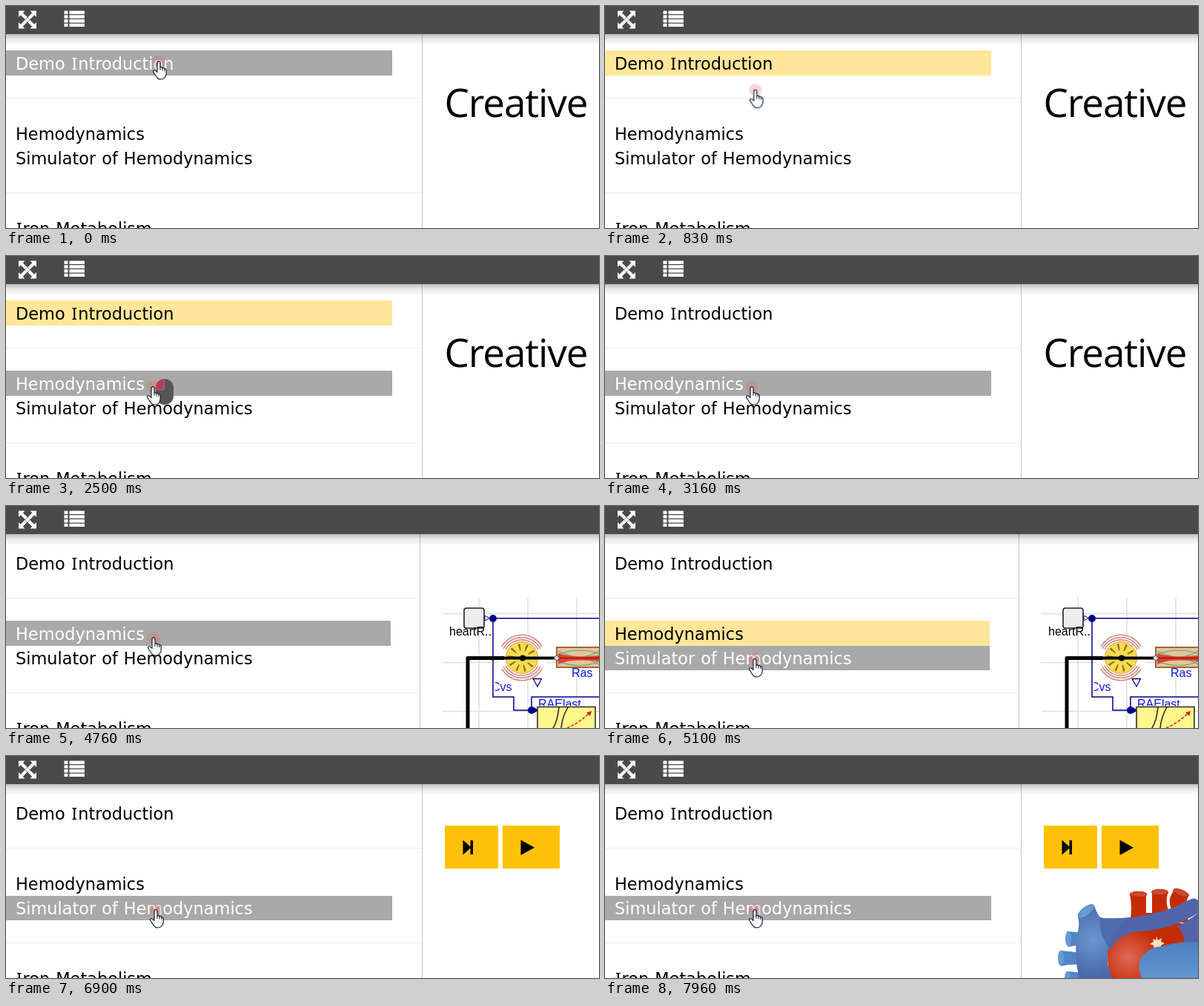
An HTML page for the animation above (8 s loop, 800x300 px).

```html
<!DOCTYPE html>
<html lang="en">
<head>
<meta charset="utf-8">
<title>Menu demo</title>
<style>
  html, body { margin: 0; width: 100%; height: 100%; overflow: hidden; background: #fff; }
  svg { display: block; width: 800px; height: 300px; }

  /* one 8 s loop shared by every part: 1% = 80 ms */
  .demo, .hemo, .simu, .rules, .bar, .heading, .diagram, .buttons, .heart, .click {
    animation: 8s step-end infinite;
  }
  .item text { fill: currentColor; }
  .menu { font: 22.45px "DejaVu Sans", sans-serif; word-spacing: .8px; }
  .menu .serif { font-family: "Noto Sans", sans-serif; }
  .heading { font: 53px "Open Sans", "Noto Sans", sans-serif; letter-spacing: -1.1px; animation-name: heading; }
  .labels { font: 16px "Liberation Sans", Arial, sans-serif; fill: #1414e0; }

  .demo { animation-name: demo; }
  .hemo { animation-name: hemo; }
  .simu { animation-name: simu; }
  .bar { --dx: -2px; animation-name: narrow; }
  .rules { --dx: -3px; animation-name: narrow; }
  .diagram { animation-name: diagram; }
  .buttons { animation-name: buttons; }
  .heart { animation-name: heart; }
  .click { animation-name: click; }
  .cursor { animation: move 8s linear infinite; }

  @keyframes demo {
    0% { fill: #a9a9a9; color: #fff; }
    9.58% { fill: #ffe699; color: #000; }
    39.5%, 100% { fill: #fff; color: #000; }
  }
  @keyframes hemo {
    0% { fill: #fff; color: #000; }
    16.25% { fill: #a9a9a9; color: #fff; }
    62.1% { fill: #ffe699; color: #000; }
    84.5%, 100% { fill: #fff; color: #000; }
  }
  @keyframes simu {
    0% { fill: #fff; color: #000; }
    62.1%, 100% { fill: #a9a9a9; color: #fff; }
  }
  @keyframes narrow {
    0% { transform: none; }
    44.5% { transform: translateX(var(--dx)); }
    86.25%, 100% { transform: none; }
  }
  @keyframes heading { 0% { opacity: 1; } 41.25%, 100% { opacity: 0; } }
  @keyframes diagram { 0% { opacity: 0; } 44.5% { opacity: 1; } 86.25%, 100% { opacity: 0; } }
  @keyframes buttons { 0% { opacity: 0; } 86.25%, 100% { opacity: 1; } }
  @keyframes heart { 0% { opacity: 0; } 90.375%, 100% { opacity: 1; } }
  @keyframes click {
    0% { opacity: 0; }
    31.25% { opacity: 1; }
    39.5% { opacity: 0; }
    80.375% { opacity: 1; }
    84.5%, 100% { opacity: 0; }
  }
  @keyframes move {
    0%, 5.42% { transform: translate(206px, 76px); animation-timing-function: cubic-bezier(.35, .2, .7, .75); }
    15.375% { transform: translate(199px, 160px); }
    16.25% { transform: translate(199px, 166px); animation-timing-function: ease-out; }
    18.75%, 58.63% { transform: translate(198px, 178px); }
    59.5% { transform: translate(199px, 179px); animation-timing-function: cubic-bezier(.4, .3, .6, 1); }
    64.5%, 100% { transform: translate(202px, 209px); }
  }
</style>
</head>
<body>
<svg viewBox="0 0 800 300">
  <defs>
    <linearGradient id="shade" x2="0" y2="1">
      <stop offset="0" stop-opacity=".25"/>
      <stop offset=".4" stop-opacity=".1"/>
      <stop offset="1" stop-opacity="0"/>
    </linearGradient>
    <radialGradient id="red" gradientUnits="userSpaceOnUse" cx="706" cy="272" r="42">
      <stop offset="0" stop-color="#dd6a58"/>
      <stop offset="1" stop-color="#c62c04"/>
    </radialGradient>
    <radialGradient id="blue" gradientUnits="userSpaceOnUse" cx="658" cy="248" r="50">
      <stop offset="0" stop-color="#6797cc"/>
      <stop offset="1" stop-color="#4a68ac"/>
    </radialGradient>
    <linearGradient id="chamber" x2="0" y2="1">
      <stop offset="0" stop-color="#4f7fc0"/>
      <stop offset="1" stop-color="#6096cf"/>
    </linearGradient>
    <path id="corner" d="M-12-12h8.500l-2.700 2.700 5.900 5.900-3 3-5.900-5.900-2.800 2.800z"/>
    <g id="row">
      <rect width="5" height="4.400" rx=".4"/>
      <rect x="7" width="20.500" height="4.400" rx=".4"/>
    </g>
    <g id="tube">
      <path d="M0-10Q12-9 26-7V9Q12 8 0 11Z" fill="#4f86c6"/>
      <ellipse rx="4" ry="10.500" fill="#649ad0"/>
    </g>
    <clipPath id="pane"><path d="M559 38H800V300H559z"/></clipPath>
    <clipPath id="cut"><path d="M660 225H800V270H660z"/></clipPath>
  </defs>

  <g class="menu">
    <g class="item demo"><rect class="bar" x="-10" y="60" width="531" height="34"/><text x="13" y="86">Demo <tspan class="serif" dx="1">I</tspan><tspan dx="1">ntroduction</tspan></text></g>
    <g class="item hemo"><rect class="bar" x="-10" y="155" width="531" height="34"/><text x="13" y="181">Hemodynamics</text></g>
    <g class="item simu"><rect class="bar" x="-10" y="189" width="531" height="33"/><text x="13" y="214">Simulator of Hemodynamics</text></g>
    <text x="13" y="309"><tspan class="serif" dx="1">I</tspan><tspan dx="1">ron Metabolism</tspan></text>
  </g>
  <g class="rules">
    <path d="M-5 124.500H561M-5 252.500H561" stroke="#ebebeb"/>
    <path d="M561.500 38V300" stroke="#c8c8c8"/>
  </g>

  <text class="heading" x="591.500" y="150">Creative</text>

  <g class="diagram" clip-path="url(#pane)" fill="none">
    <path d="M638 124V300M704 124V300M770 124V300M589 145.500H800M589 211.500H800M589 277.500H800" stroke="#dedede" stroke-width="1.500"/>
    <path d="M657 151.700H800M657 152V258H685V276H709M709 276V258H800" stroke="#00008b" stroke-width="1.500"/>
    <rect x="618" y="138" width="27" height="27" rx="3" fill="#ececec" stroke="#222" stroke-width="1.600"/>
    <path d="M646 148l6 3.500-6 3.500z" fill="#fff" stroke="#00008b"/>
    <g fill="#00008b"><circle cx="657" cy="152" r="5"/><circle cx="709" cy="276" r="5"/><path d="M712 272l7 4-7 4z"/></g>

    <circle cx="696" cy="205" r="33" fill="#fff"/>
    <path d="M669 190a31 31 0 0 1 54 0M671 193a28 28 0 0 1 50 0M674 194a25 25 0 0 1 44 0M669 220a31 31 0 0 0 54 0M671 217a28 28 0 0 0 50 0M674 216a25 25 0 0 0 44 0" stroke="#d48a82" stroke-width="1.600"/>
    <circle cx="696" cy="205" r="21.500" fill="#f6dc50" stroke="#d89a4a"/>
    <circle cx="696" cy="205" r="14.500" stroke="#8a681c" stroke-width="9" stroke-dasharray="2 7.110"/>
    <path d="M623 300V205.500H672" stroke="#000" stroke-width="5" stroke-linejoin="round"/>
    <path d="M670 205.500H740" stroke="#000" stroke-width="4"/>
    <circle cx="697" cy="205.500" r="4" fill="#000"/>
    <rect x="743" y="191" width="64" height="27" fill="#e6c49c" stroke="#a8642c" stroke-width="2"/>
    <path d="M745 196Q775 212 800 196M745 214Q775 199 800 214M745 200Q775 190 800 200M745 210Q775 221 800 210" stroke="#5fa882" stroke-width="1.200"/>
    <path d="M745 199Q765 206 800 202V210Q765 206 745 213z" fill="#e3402c"/>
    <path d="M745 205.500H800" stroke="#a01010" stroke-width="1.500"/>
    <path d="M739 205.500l4-4 4 4-4 4z" fill="#ddd" stroke="#222"/>
    <path d="M711 233.500H722.500L717 244z" fill="#fff" stroke="#00008b" stroke-width="1.300"/>

    <rect x="717" y="271.500" width="78" height="40" fill="#fff78c" stroke="#222" stroke-width="1.500"/>
    <path d="M738 300Q744 291 746 272M749 300Q750 286 758 272" stroke="#222" stroke-width="1.500"/>
    <path d="M757 300Q772 294 788 279" stroke="#e02010" stroke-width="1.500" stroke-dasharray="4 2"/>
    <path d="M790 277l-2 7-5-5z" fill="#e02010"/>
    <g class="labels">
      <text x="598" y="175" fill="#000">heartR..</text>
      <text x="763" y="231">Ras</text>
      <g clip-path="url(#cut)"><text x="655" y="250">Cvs</text><text x="718" y="273">RAElast</text></g>
    </g>
  </g>

  <g class="buttons">
    <path d="M592 94H664V152H592zM670 94H747V152H670z" fill="#ffc107"/>
    <path d="M616.500 113.500L626.500 122.500V114H630V133H626.500V124.500L616.500 133.500zM694.500 113.500L713 123.800 694.500 134z"/>
  </g>

  <g class="heart">
    <path d="M708 187Q712 205 708 225H790Q777 212 788 187L768 181Q760 192 760 204V184H737V205Q732 200 731 187z" fill="#c62c04"/>
    <path d="M732 188V212M736 185V212M761 186Q758 198 762 208" fill="none" stroke="#fff" stroke-width="4"/>
    <g fill="#d0482e" stroke="#b82804">
      <ellipse cx="719.500" cy="187" rx="11.500" ry="3.800"/>
      <ellipse cx="748.500" cy="184" rx="11" ry="3.800"/>
      <ellipse cx="777" cy="185" rx="11" ry="4" transform="rotate(22 777 185)"/>
    </g>
    <path d="M680 240Q725 215 778 226Q792 243 792 262L760 300H682Q674 270 680 240z" fill="url(#red)"/>
    <path d="M772 230Q788 222 800 212V264L780 256Q784 243 772 230z" fill="#5662a6"/>
    <path d="M744 244l2 5 5-3-1 5 5 2-5 3 1 5-6-2-4 3-1-6-5-2 5-3-1-4 4 2z" fill="#f4dfc0"/>
    <use href="#tube" x="625" y="247"/>
    <use href="#tube" x="615" y="273"/>
    <use href="#tube" x="624" y="301"/>
    <path d="M638 217Q641 228 637 240Q632 272 640 300H684Q674 278 680 256Q685 240 700 236Q675 228 672 219Q667 218 665 214L660 203z" fill="url(#blue)"/>
    <path d="M668 219Q738 222 787 195Q795 190 800 195V212Q767 234 722 237Q694 239 682 262Q668 242 668 219z" fill="#5164a9"/>
    <path d="M668 219Q690 221 708 219Q690 230 680 254Q666 244 668 219z" fill="#4c6cb0"/>
    <ellipse cx="649" cy="210" rx="13" ry="5.500" transform="rotate(-38 649 210)" fill="#669cd2" stroke="#4a78ba"/>
    <path d="M724 300Q717 282 724 272Q734 258 752 257Q778 249 800 252V300z" fill="url(#chamber)"/>
  </g>

  <rect width="800" height="38" fill="#4a4a4a"/>
  <rect y="38" width="800" height="15" fill="url(#shade)"/>
  <g fill="#fff">
    <g transform="translate(29 18.500)">
      <use href="#corner"/><use href="#corner" transform="rotate(90)"/>
      <use href="#corner" transform="rotate(180)"/><use href="#corner" transform="rotate(270)"/>
      <path d="M-3.200 0L0-3.200 3.200 0 0 3.200z"/>
    </g>
    <use href="#row" x="78.500" y="6.600"/><use href="#row" x="78.500" y="12.300"/>
    <use href="#row" x="78.500" y="18"/><use href="#row" x="78.500" y="23.700"/>
  </g>

  <g class="cursor">
    <circle cy="-1" r="8.500" fill="#f06464" fill-opacity=".27"/>
    <g class="click">
      <rect x="4" y="-12" width="24" height="35" rx="12" fill="#555"/>
      <path d="M15-11.500A11.500 11.500 0 0 0 4.500 2H15z" fill="#e0303c"/>
      <path d="M15.500-11.500V2.500H4.500" fill="none" stroke="#7a7a9a"/>
      <path d="M12-7Q8-2 12 2" fill="none" stroke="#3c5ce0" stroke-width="1.500"/>
    </g>
    <g transform="translate(0 -1.500)" stroke="#111a2c">
      <path d="M-2 2.200a2 2 0 0 1 4 0V8.500q2.200-1.200 3 .8q2.200-.8 2.900 1q2.300-.3 2.300 2.200V17q0 3-2 5-2 2.500-5 2.500-4 0-5.200-2-1.500-2-4.500-6.500-2-3 .3-3.700 1.800-.3 4.200 2.700z" fill="#fff" stroke-width="1.200" stroke-linejoin="round"/>
      <path d="M2 8.500V12.500M5 9.500V13M7.900 10.500V13.500"/>
    </g>
  </g>
</svg>
</body>
</html>
```
